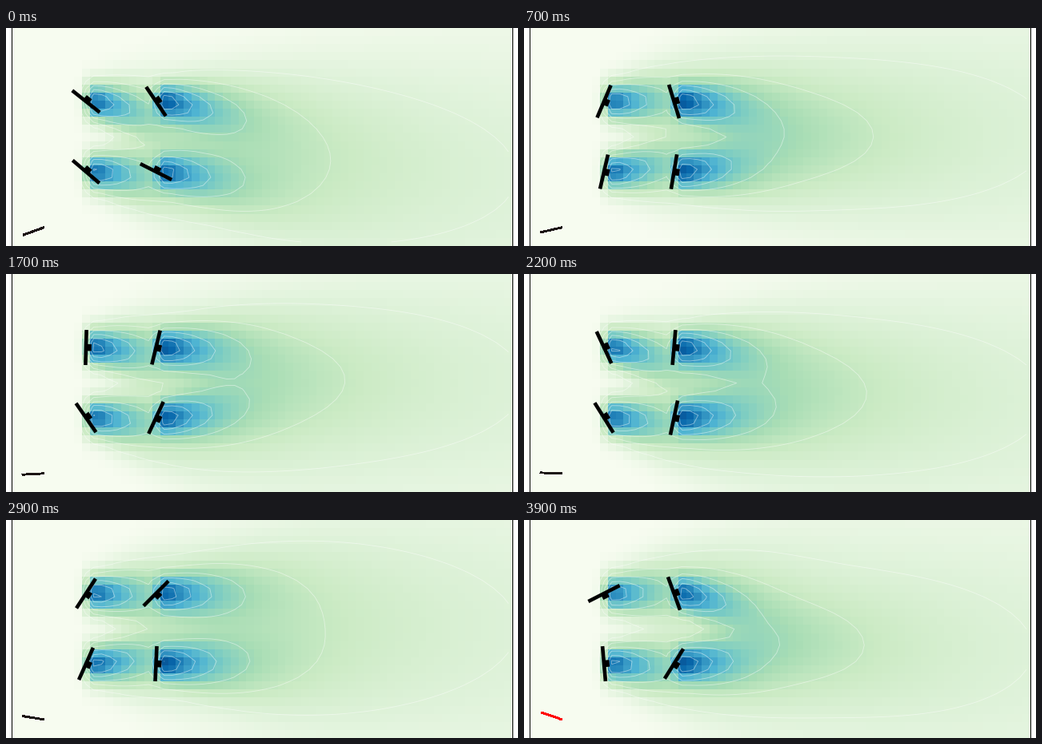
These frames come from a looping animation (640 by 273 pixels, 4 s). A matplotlib script:

```python
import numpy as np
import matplotlib.pyplot as plt
from matplotlib.animation import FuncAnimation

W, H, DPI = 640, 273, 100
FRAMES, INTERVAL = 40, 100
PX = 72 / DPI                      # one pixel in points
LEFT, RIGHT = 7, 633
COLS, ROWS = 64, 27
ROTORS = [(100, 92), (187.5, 92), (100, 180), (187.5, 180)]
RADIUS = 22
DRIFT = [0.28, 0.28, -0.05, -0.05]     # sideways drift of each wake
LEVELS = 0.14 + 0.13 * np.arange(7)

# Rotor tilts in degrees, clockwise from vertical, at key steps
POSES = {
    0: (-51.5, -34, -49.5, -63),
    7: (23, -17, 13, 9.5),
    13: (23, 20.5, -36.6, 35),
    22: (-25, 5, -32, 12),
    29: (33, 45, 24, 2.6),
    34: (0, 17, 2.5, 23),
    39: (63, -20, -5, 32),
}
TILTS = np.column_stack([
    np.interp(np.arange(FRAMES), list(POSES), track)
    for track in zip(*POSES.values())])

xs = LEFT + (np.arange(COLS) + 0.5) * (RIGHT - LEFT) / COLS
ys = (np.arange(ROWS) + 0.5) * H / ROWS
X, Y = np.meshgrid(xs, ys)


def wind_angle(k):
    return 20 - k


def wake(x0, y0, yaw, drift):
    """Speed deficit behind one rotor: a widening, deflected Gaussian."""
    d = X - x0
    down = np.maximum(d, 0)
    far = np.maximum(d - 15, 0)
    sigma = 17 + 0.22 * far
    bend = down ** 2 / (down + 80) / (1 + down / 250)
    centre = y0 + (drift - 0.5 * np.sin(yaw)) * bend
    onset = 0.5 * (1 + np.tanh(d / 6))
    peak = 0.88 * np.cos(yaw) ** 0.3 * (1 + far / 115) ** -1.5
    return onset * peak * np.exp(-((Y - centre) / sigma) ** 2 / 2)


def deficit(k):
    """Wakes combine as the root of the sum of squares."""
    yaws = np.radians(TILTS[k] + wind_angle(k))
    return np.sqrt(sum(wake(x, y, yaw, drift) ** 2
                       for (x, y), yaw, drift in zip(ROTORS, yaws, DRIFT)))


fig = plt.figure(figsize=(W / DPI, H / DPI), dpi=DPI, facecolor="white")
ax = fig.add_axes([0, 0, 1, 1])
field = ax.imshow(deficit(0), cmap="GnBu", vmin=0, vmax=1, aspect="auto",
                  interpolation="nearest", extent=(LEFT, RIGHT, H, 0))
ax.set_xlim(0, W)
ax.set_ylim(H, 0)
ax.axis("off")
for edge in (LEFT, RIGHT):
    ax.plot([edge, edge], [0, H], color="black", lw=PX, zorder=4)


def bar(width, smooth=True):
    return ax.plot([], [], color="black", lw=width * PX, antialiased=smooth,
                   solid_capstyle="butt", zorder=5)[0]


blades = [bar(4.6) for _ in ROTORS]
hubs = [bar(8.5) for _ in ROTORS]
vane = bar(1.9, smooth=False)
contours = []


def draw(k):
    values = deficit(k)
    field.set_data(values)
    while contours:
        contours.pop().remove()
    contours.append(ax.contour(xs, ys, values, levels=LEVELS, colors="white",
                               alpha=0.45, linewidths=0.9 * PX, zorder=3))
    for (x, y), tilt, blade, hub in zip(ROTORS, np.radians(TILTS[k]),
                                        blades, hubs):
        s, c = np.sin(tilt), np.cos(tilt)
        blade.set_data([x - RADIUS * s, x + RADIUS * s],
                       [y + RADIUS * c, y - RADIUS * c])
        hub.set_data([x, x + 6.8 * c], [y, y + 6.8 * s])
    a = np.radians(wind_angle(k))
    vane.set_data([47.3 - 27.3 * np.cos(a), 47.3],
                  [249.8 + 27.3 * np.sin(a), 249.8])
    vane.set_color("red" if wind_angle(k) < -10 else "#1c1414")
    return [field, vane, *blades, *hubs]


anim = FuncAnimation(fig, draw, frames=FRAMES, interval=INTERVAL,
                     init_func=lambda: draw(0), repeat=True, repeat_delay=0,
                     blit=False)
plt.show()
```
